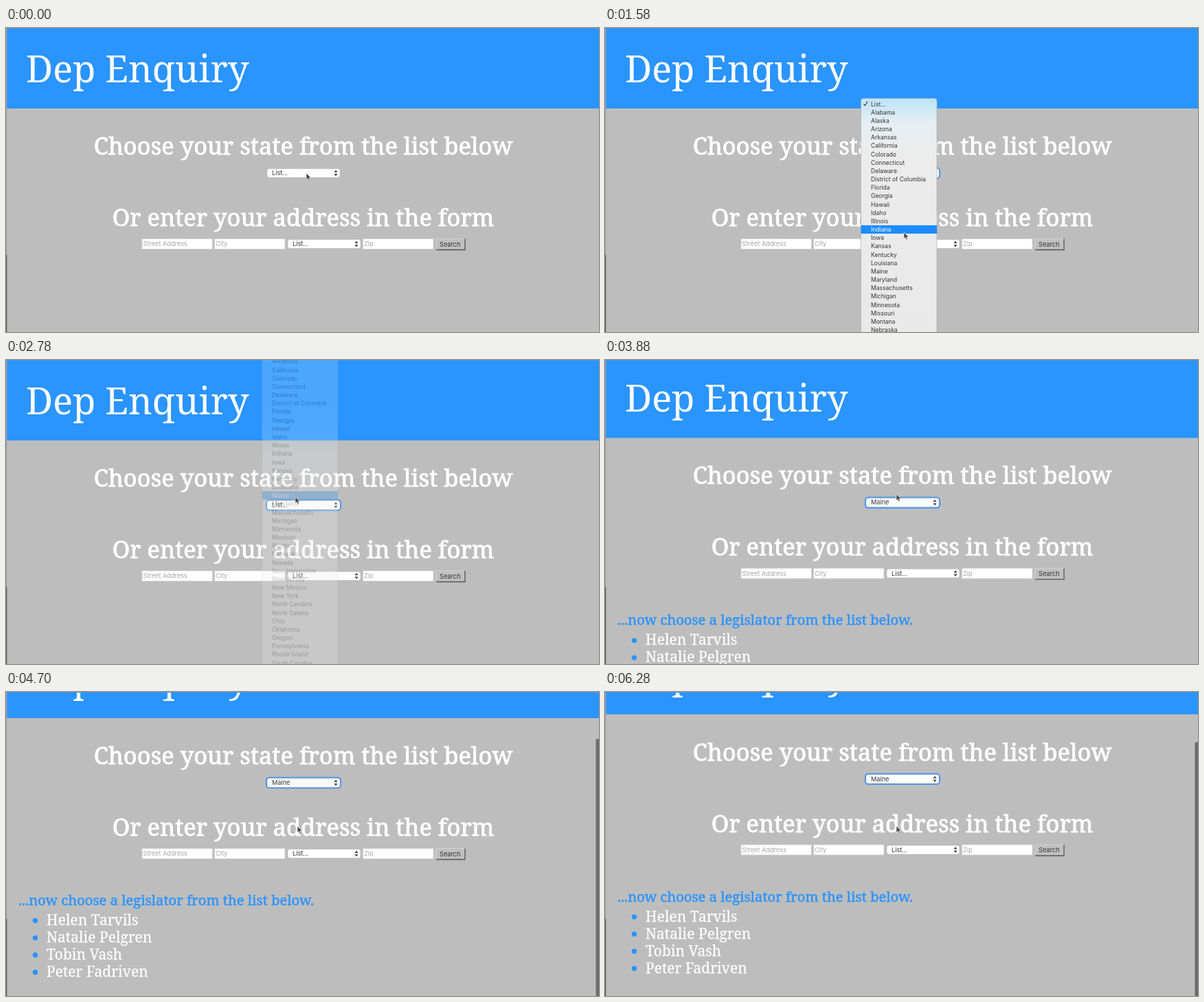
Recreate the animation shown at these times as an HTML page. Size 863 by 442 pixels, loop 6300 ms.

```html
<!DOCTYPE html>
<html lang="en">
<head>
<meta charset="utf-8">
<title>Dep Enquiry</title>
<style>
  html, body { margin: 0; width: 100%; height: 100%; overflow: hidden; background: #bdbdbd; }
  svg { display: block; width: 100%; height: 100%; }
  .slab { font-family: "Noto Serif", serif; fill: #fff; }
  .title { font-size: 54px; }
  .heading { font-size: 34.5px; text-anchor: middle; stroke: #fff; stroke-width: .9px; }
  .sub { font-size: 20.2px; fill: #2a94ff; stroke: #2a94ff; stroke-width: .5px; }
  .item { font-size: 21px; stroke: #fff; stroke-width: .25px; }
  .ui { font: 9.2px Inter, Roboto, sans-serif; fill: #333; }
  .hint { fill: #a6a6a6; }
  .row { font: 8.55px Inter, Roboto, sans-serif; fill: #333; }
  .row.on { fill: #fff; }
</style>
</head>
<body>
<svg viewBox="0 0 863 442" preserveAspectRatio="none">
  <defs>
    <linearGradient id="glass" gradientUnits="userSpaceOnUse" x1="0" y1="0" x2="0" y2="442">
      <stop offset="0" stop-color="#a9dcf9"/>
      <stop offset=".2" stop-color="#ace0fb"/>
      <stop offset=".31" stop-color="#e6eef2"/>
      <stop offset=".4" stop-color="#ececec"/>
      <stop offset="1" stop-color="#e9e9e9"/>
    </linearGradient>
    <g id="select">
      <rect width="106" height="13" rx="3" fill="#fff" stroke="#a8a8a8" stroke-width=".5"/>
      <path d="M97.5 5.5l2.5-3.5 2.5 3.5zM97.5 7.5l2.5 3.5 2.5-3.5z" fill="#444"/>
    </g>
  </defs>
  <rect width="863" height="442" fill="#bdbdbd"/>

  <g id="page">
    <rect y="-10" width="863" height="127" fill="#2a94ff"/>
    <text class="slab title" x="29" y="79">Dep Enquiry</text>
    <text class="slab heading" x="432.5" y="184">Choose your state from the list below</text>
    <rect id="ring" x="379" y="203.5" width="108" height="15" rx="4" fill="none" stroke="#4a97ee" stroke-width="2.2"/>
    <use href="#select" x="380" y="204.5"/>
    <text id="choice" class="ui" x="387" y="214">List...</text>
    <text class="slab heading" x="432.5" y="288">Or enter your address in the form</text>
    <g id="form"></g>
    <use href="#select" x="410" y="307.5"/>
    <text class="ui" x="417" y="317.3">List...</text>
    <rect x="626" y="306.5" width="42" height="16" fill="#c0c0c0"/>
    <path d="M626 322.5V306.5H668" fill="none" stroke="#d4d4d4"/>
    <path d="M626 322.5H668V306.5" fill="none" stroke="#555" stroke-width="1.3"/>
    <text class="ui" x="631" y="317.7">Search</text>
    <g id="results">
      <text class="slab sub" x="18" y="389">...now choose a legislator from the list below.</text>
    </g>
  </g>

  <rect id="thumb" x="858.5" width="6" height="380" rx="2.5" fill="#6c6c6c"/>
  <path d="M0 .5H863" stroke="#4d92d8"/>
  <path d="M.7 0V330" stroke="#a2a2a2" stroke-width="1.4"/>
  <path d="M.7 330V442" stroke="#5c5c5c" stroke-width="1.4"/>

  <g id="menu">
    <rect id="panel" x="372.5" width="110.5" height="700" rx="4" fill="url(#glass)" stroke="#a5a5a5" stroke-width=".6"/>
    <rect id="hover" x="372.5" width="110.5" height="12.2" fill="#1c8cff"/>
    <g id="rows"><path id="tick" d="M376.5 0l2 2.5 3.5-6" fill="none" stroke="#333" stroke-width="1.1"/></g>
  </g>
  <path id="cursor" d="M0 0V9.5L2.2 7.6 3.8 11 5.4 10.2 3.9 7H6.8Z" fill="#444" stroke="#eee" stroke-width=".7"/>
</svg>

<script>
const LOOP = 6300, PITCH = 12.17, TOP = 209;
const OPEN = 320, PICK = 2640, CHOSEN = 2860, LOADED = 3450;
const STATES = ("List...,Alabama,Alaska,Arizona,Arkansas,California,Colorado,Connecticut,Delaware," +
  "District of Columbia,Florida,Georgia,Hawaii,Idaho,Illinois,Indiana,Iowa,Kansas,Kentucky," +
  "Louisiana,Maine,Maryland,Massachusetts,Michigan,Minnesota,Missouri,Montana,Nebraska,Nevada," +
  "New Hampshire,New Jersey,New Mexico,New York,North Carolina,North Dakota,Ohio,Oklahoma," +
  "Oregon,Pennsylvania,Rhode Island,South Carolina,South Dakota,Tennessee,Texas,Utah").split(",");
const PEOPLE = ["Helen Tarvils", "Natalie Pelgren", "Tobin Vash", "Peter Fadriven"];

// Motion tracks: [time, value]
const CURSOR_X = [[500, 437], [900, 435], [2300, 435], [2560, 421], [2780, 421], [3000, 424]];
const CURSOR_Y = [[500, 211], [900, 297], [2300, 297], [2560, 199], [2780, 199], [3000, 195]];
const MENU_Y = [[1220, 0], [1400, -38], [1800, -172], [2060, -218.7], [2300, -255.4]];
const SCROLL = [[3820, 0], [3880, 3.5], [4100, 32], [4300, 56], [4500, 71], [4700, 79], [4900, 83], [5150, 84.5]];

const $ = id => document.getElementById(id);

function add(parent, tag, attrs, text = "") {
  const el = document.createElementNS("http://www.w3.org/2000/svg", tag);
  for (const key in attrs) el.setAttribute(key, attrs[key]);
  el.textContent = text;
  return parent.appendChild(el);
}

function at(track, t) {
  const i = track.findIndex(point => point[0] > t);
  if (i === 0) return track[0][1];
  if (i < 0) return track[track.length - 1][1];
  const [t0, a] = track[i - 1], [t1, b] = track[i];
  return a + (b - a) * (t - t0) / (t1 - t0);
}

const clamp = v => Math.max(0, Math.min(1, v));
const show = (el, on) => el.setAttribute("opacity", Number(on));
const move = (el, x, y) => el.setAttribute("transform", `translate(${x} ${y})`);

for (const [x, label] of [[198, "Street Address"], [303.5, "City"], [519.5, "Zip"]]) {
  add($("form"), "rect", { x, y: 306.5, width: 102.5, height: 15, fill: "#fff", stroke: "#d0d0d0" });
  add($("form"), "text", { x: x + 1.5, y: 317.3, class: "ui hint" }, label);
}
PEOPLE.forEach((name, i) => {
  const y = 418 + i * 25;
  add($("results"), "circle", { cx: 42.5, cy: y - 6.5, r: 3.7, fill: "#2a94ff" });
  add($("results"), "text", { x: 59, y, class: "slab item" }, name);
});
const rows = STATES.map((name, i) =>
  add($("rows"), "text", { x: 387, y: i * PITCH + 3.2, class: "row" }, name));

function draw(now) {
  const t = now % LOOP;
  const x = at(CURSOR_X, t), y = at(CURSOR_Y, t);
  const base = TOP + at(MENU_Y, t), scroll = at(SCROLL, t);
  const hovered = Math.round((y - base) / PITCH);

  move($("cursor"), x, y);
  move($("page"), 0, -scroll);
  show($("ring"), t >= OPEN);
  $("choice").textContent = t < CHOSEN ? "List..." : "Maine";
  show($("results"), t >= LOADED);
  $("thumb").setAttribute("y", scroll * .86);
  show($("thumb"), clamp((t - 3900) / 150));

  show($("menu"), t < OPEN ? 0 : clamp(1 - (t - PICK) / 190));
  $("panel").setAttribute("y", base - 8);
  move($("rows"), 0, base);
  if (t < PICK) {
    $("hover").setAttribute("y", base + hovered * PITCH - 6.1);
    rows.forEach((row, i) => row.classList.toggle("on", i === hovered));
    $("tick").setAttribute("stroke", hovered === 0 ? "#fff" : "#333");
  }
}

function frame() {
  draw(performance.now());
  requestAnimationFrame(frame);
}
frame();
</script>
</body>
</html>
```
